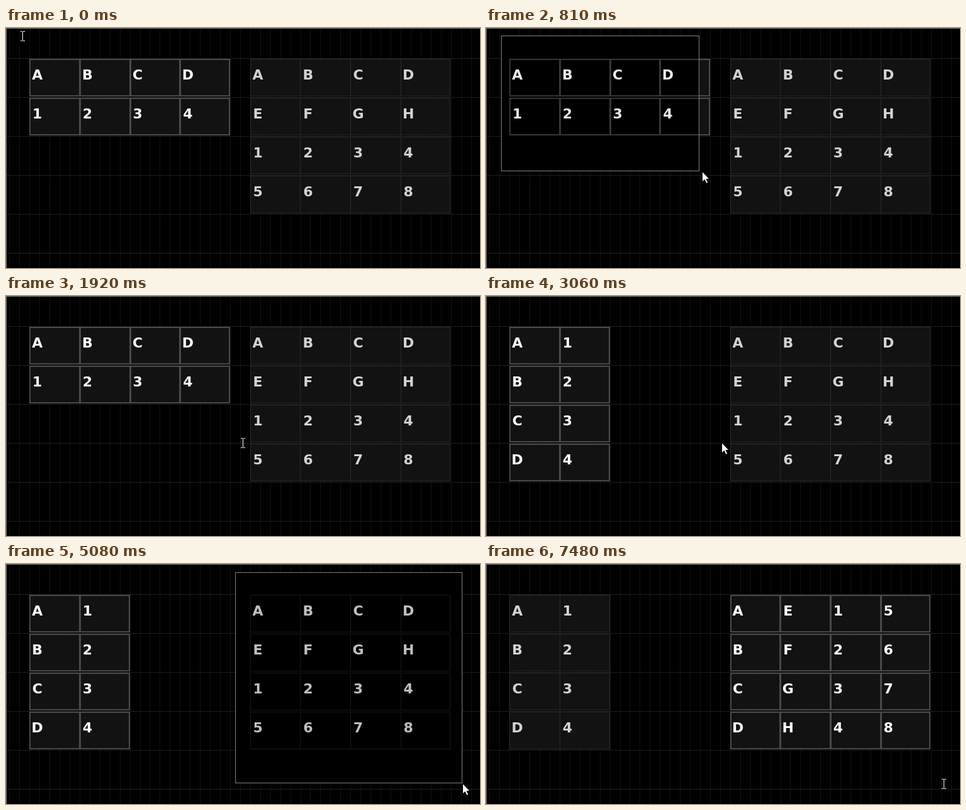
Animation, 753 px wide and 382 px high, one loop 8000 ms. Source, as an HTML page with a canvas:

```html
<!DOCTYPE html>
<html lang="en">
<head>
<meta charset="utf-8">
<title>Transposing cells</title>
<style>
html, body { margin: 0; width: 100%; height: 100%; overflow: hidden; background: #000; }
canvas { display: block; }
</style>
</head>
<body>
<canvas id="stage" width="753" height="382"></canvas>
<script>
const ctx = document.getElementById('stage').getContext('2d');
const LOOP = 8000, CELL = 79.7, CHAR = 15.94, ROW = 62;

// time, pointer kind, pointer x, y, far corner of the selection (if any)
const steps = [
  [0, 'beam', 26, 13],
  [400, 'arrow', 26, 13],
  [550, 'beam', 24, 16],
  [670, 'arrow', 234, 200, 222, 193],
  [810, 'arrow', 343, 228, 339, 228],
  [930, 'arrow', 351, 231, 350, 231],
  [1180, 'arrow', 358, 232, 357, 232],
  [1300, 'arrow', 368, 233, 366, 233],
  [1420, 'arrow', 372, 233, 372, 233],
  [1920, 'beam', 376, 234],
  [2680, 'arrow', 374, 233],
  [3310, 'beam', 376, 234],
  [3960, 'arrow', 390, 40],
  [4110, 'beam', 366, 14],
  [4230, 'arrow', 376, 26, 372, 22],
  [4350, 'arrow', 402, 57, 394, 48],
  [4480, 'arrow', 440, 102, 429, 90],
  [4600, 'arrow', 485, 151, 472, 141],
  [4720, 'arrow', 612, 252, 590, 236],
  [4840, 'arrow', 711, 337, 700, 328],
  [4960, 'arrow', 721, 346, 719, 345],
  [5080, 'arrow', 725, 349, 725, 349],
  [5710, 'beam', 727, 350],
  [6600, 'arrow', 725, 348],
  [7480, 'beam', 727, 350]
];

const gray = v => `rgb(${v},${v},${v})`;

function rect(x, y, w, h, v) {
  ctx.fillStyle = gray(v);
  ctx.fillRect(x, y, w, h);
}

function grid() {
  for (let x = 5.3; x < 753; x += CHAR) rect(Math.round(x), 0, 1, 382, 18);
  for (let y = 48; y < 382; y += ROW) rect(0, y, 753, 1, 30);
  rect(0, 0, 753, 1, 128);
  rect(0, 0, 1, 382, 128);
}

function table(left, rows, focused, dim) {
  const tone = v => Math.max(0, v - dim);
  const line = focused ? 2 : 1;
  const edge = c => Math.round(left + c * CELL);
  rows.forEach((row, r) => [...row].forEach((label, c) => {
    const x = edge(c), y = 49 + r * ROW;
    const w = edge(c + 1) - x + (c < row.length - 1 ? 1 : 0);
    rect(x, y, w, 60, tone(focused ? 74 : 44));
    rect(x + line, y + line, w - 2 * line, 60 - 2 * line, tone(18));
  }));
  ctx.fillStyle = gray(tone(focused ? 255 : 212));
  rows.forEach((row, r) => [...row].forEach((label, c) =>
    ctx.fillText(label, left + 12.5 + c * CELL, 82 + r * ROW)));
}

function tables(t, dim) {
  const leftFocus = t < 5710;
  table(37.2, t < 3060 ? ['ABCD', '1234'] : ['A1', 'B2', 'C3', 'D4'], leftFocus, dim);
  table(387.6, t < 7230 ? ['ABCD', 'EFGH', '1234', '5678']
                        : ['AE15', 'BF26', 'CG37', 'DH48'], !leftFocus, dim);
}

function selection(t, right, bottom) {
  const x = t < 3000 ? 24 : 364, y = t < 3000 ? 12 : 13;
  const w = right - x, h = bottom - y;
  ctx.save();
  ctx.beginPath();
  ctx.rect(x, y, w, h);
  ctx.clip();
  rect(x, y, w, h, 0);
  tables(t, 20);
  ctx.restore();
  ctx.strokeStyle = gray(128);
  ctx.lineWidth = 1;
  ctx.strokeRect(x + .5, y + .5, w - 1, h - 1);
}

const arrowShape = new Path2D(
  'M.5 .5V17L4.3 13.4L7 19.4L9.7 18.2L7.1 12.4H12Z');

function pointer(kind, x, y) {
  if (kind === 'beam') {
    rect(x, y - 7, 1, 14, 255);
    for (const dy of [-8, 7]) {
      rect(x - 3, y + dy, 3, 1, 255);
      rect(x + 1, y + dy, 3, 1, 255);
    }
    return;
  }
  ctx.save();
  ctx.translate(x, y);
  ctx.fillStyle = '#fff';
  ctx.strokeStyle = '#000';
  ctx.lineWidth = 1;
  ctx.fill(arrowShape);
  ctx.stroke(arrowShape);
  ctx.restore();
}

function draw() {
  const t = performance.now() % LOOP;
  const [, kind, x, y, right, bottom] = steps.findLast(s => s[0] <= t);
  ctx.font = 'bold 22px "DejaVu Sans", sans-serif';
  ctx.textAlign = 'center';
  rect(0, 0, 753, 382, 0);
  grid();
  tables(t, 0);
  if (right) selection(t, right, bottom);
  pointer(kind, x, y);
  requestAnimationFrame(draw);
}
draw();
</script>
</body>
</html>
```
